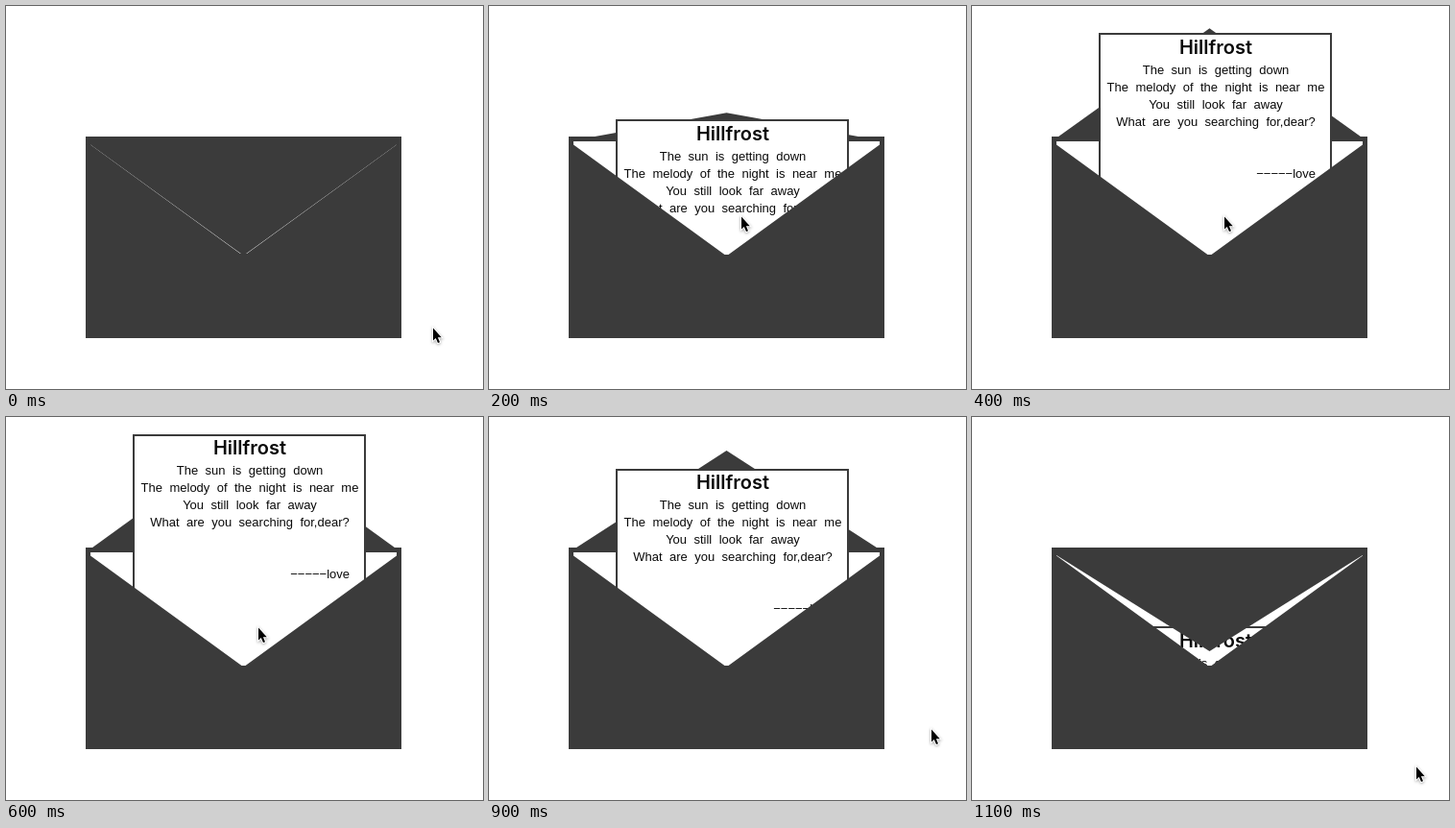
These frames come from a looping animation (497 px wide and 399 px high, 1200 ms). An HTML page with a canvas:

```html
<!DOCTYPE html>
<html lang="en">
<head>
<meta charset="utf-8">
<title>Letter in an envelope</title>
<style>
html, body { margin: 0; width: 100%; height: 100%; overflow: hidden; background: #fff; }
canvas { display: block; }
</style>
</head>
<body>
<canvas id="stage" width="497" height="399"></canvas>
<script>
const ctx = document.getElementById('stage').getContext('2d');
const DARK = '#3b3b3b';
const LOOP = 1200, STEP = 100, MOVE = 500, OPEN_AT = 32, CLOSE_AT = 834;
const LEFT = 88, RIGHT = 407, MID = 247.5, HINGE = 141;
const LETTER_UP = 17.6, LETTER_DOWN = 258;
const VERSE = [
  'The sun is getting down',
  'The melody of the night is near me',
  'You still look far away',
  'What are you searching for,dear?'
];
// pointer tip at each step
const POINTER = [
  [445, 335], [285, 232], [263, 219], [263, 219], [263, 219], [263, 219],
  [263, 219], [263, 219], [350, 270], [461, 325], [466, 328], [463, 364]
];
const ARROW = [[0, 0.5], [0, 13.5], [2.8, 11], [5, 16], [7, 15.2], [4.9, 10.2], [8.8, 10.2]];

// cubic-bezier(.25, .1, .25, 1)
function ease(x) {
  if (x <= 0) return 0;
  if (x >= 1) return 1;
  let lo = 0, hi = 1;
  for (let i = 0; i < 25; i++) {
    const u = (lo + hi) / 2;
    if (.75 * u * (1 - u) + u ** 3 < x) lo = u; else hi = u;
  }
  return .3 * lo * (1 - lo) ** 2 + 3 * lo * lo * (1 - lo) + lo ** 3;
}

function trace(points) {
  ctx.beginPath();
  for (const [x, y] of points) ctx.lineTo(x, y);
  ctx.closePath();
}

function fill(points, color) {
  trace(points);
  ctx.fillStyle = color;
  ctx.fill();
}

function drawFlap(turn) {
  const edge = HINGE + 3.5 * turn;
  fill([[LEFT, HINGE], [LEFT, edge], [MID, HINGE + 119 * turn], [RIGHT, edge], [RIGHT, HINGE]], DARK);
}

function drawLetter(y) {
  const top = Math.round(y), textTop = Math.round(y + 21.85);
  ctx.save();
  ctx.beginPath();
  ctx.rect(0, 0, 497, 300);
  ctx.clip();
  ctx.fillStyle = '#fff';
  ctx.strokeStyle = DARK;
  ctx.lineWidth = 2;
  ctx.beginPath();
  ctx.rect(133, top + 1, 241, 300);
  ctx.fill();
  ctx.stroke();

  ctx.fillStyle = '#0a0a0a';
  ctx.textAlign = 'center';
  ctx.wordSpacing = '0px';
  ctx.font = '600 20px Inter, sans-serif';
  ctx.fillText('Hillfrost', 254, textTop);
  ctx.font = '13px "Liberation Sans", Arial, sans-serif';
  ctx.wordSpacing = '3.8px';
  VERSE.forEach((line, i) => ctx.fillText(line, 254, textTop + 21 + 18 * i));
  ctx.textAlign = 'right';
  ctx.fillText('\u2212'.repeat(5) + 'love', 358, textTop + 129);
  ctx.restore();
}

function drawPocket() {
  fill([[83, 144.5], [LEFT, 144.5], [245.5, 259], [249.5, 259], [RIGHT, 144.5],
    [412, 144.5], [412, 346], [83, 346]], DARK);
}

function drawPointer([x, y]) {
  ctx.save();
  ctx.translate(x, y);
  trace(ARROW);
  ctx.shadowColor = 'rgba(0,0,0,.35)';
  ctx.shadowBlur = 3;
  ctx.shadowOffsetY = 1;
  ctx.strokeStyle = '#fff';
  ctx.lineWidth = 2;
  ctx.stroke();
  ctx.restore();
  ctx.save();
  ctx.translate(x, y);
  fill(ARROW, '#000');
  ctx.restore();
}

function draw(ms) {
  const step = Math.floor(ms % LOOP / STEP), t = step * STEP;
  const open = ease((t - OPEN_AT) / MOVE) - ease((t - CLOSE_AT) / MOVE) * (t >= CLOSE_AT);
  const turn = Math.cos(Math.PI * open);

  ctx.fillStyle = '#fff';
  ctx.fillRect(0, 0, 497, 399);
  ctx.fillStyle = DARK;
  ctx.fillRect(83, 136, 329, 210);
  ctx.fillStyle = '#fff';
  ctx.fillRect(LEFT, HINGE, RIGHT - LEFT, 150);

  if (turn < 0) drawFlap(turn);
  drawLetter(LETTER_DOWN + (LETTER_UP - LETTER_DOWN) * open);
  drawPocket();
  if (turn >= 0) drawFlap(turn);
  drawPointer(POINTER[step]);
}

const start = performance.now();
function tick() {
  draw(performance.now() - start);
  requestAnimationFrame(tick);
}
tick();
</script>
</body>
</html>
```
